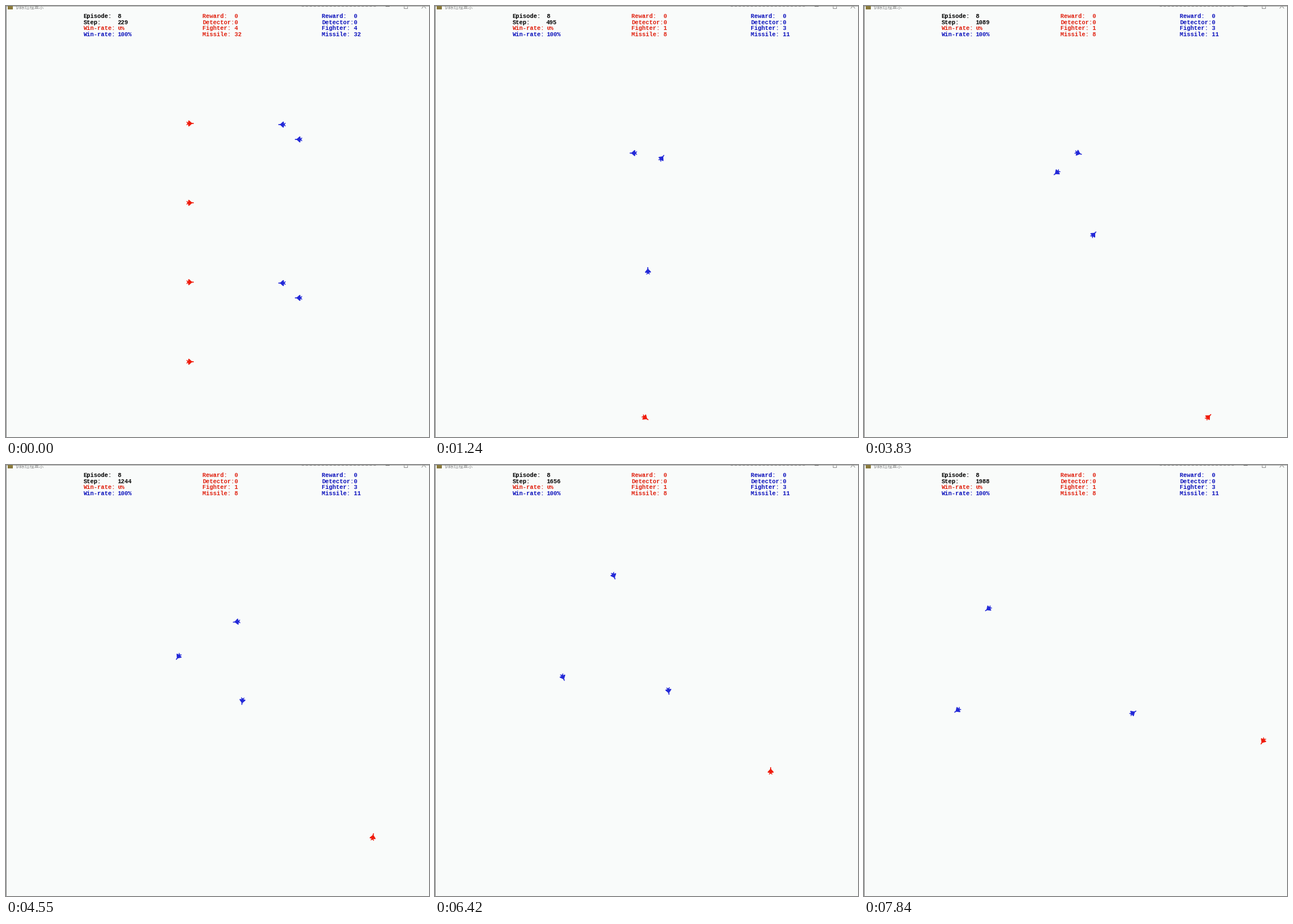
A matplotlib script that plays this animation: 741 by 756 pixels, repeating every 7.99 s.

```python
import numpy as np
import matplotlib.pyplot as plt
from matplotlib.animation import FuncAnimation
from matplotlib.patches import Polygon, Rectangle

W, H, DPI = 741, 756, 64
FRAMES, INTERVAL = 470, 17          # 7990 ms loop
HOLD = 133                          # ms a picture stays, roughly
SPEED = 0.13                        # px per ms

BG = "#f9fbfa"
RED, BLUE = "#f01c0c", "#2329d8"
RED_TEXT, BLUE_TEXT = "#e0200e", "#0a10bc"

# Key moments and the step counter at each
KEYS = (0, 1240, 2590, 3830, 5220, 6420, 7840)
STEPS = (229, 495, 804, 1089, 1398, 1656, 1988)
TIMES = np.concatenate(
    [np.linspace(a, b, round((b - a) / HOLD), endpoint=False)
     for a, b in zip(KEYS, KEYS[1:])] + [KEYS[-1:]])

# Survivors: x, y, heading in degrees at the key moments after the start
RED_PATH = [(368, 722, -35), (511, 698, 30), (603, 721, 44),
            (627, 577, 120), (588, 537, 90), (699, 484, 237)]
BLUE_PATHS = [
    [(348, 258, 180), (345, 225, 192), (338, 292, 218),
     (260, 335, 158), (224, 372, -66), (164, 430, 215)],
    [(397, 267, 52), (361, 229, 188), (375, 258, -20),
     (349, 261, 160), (313, 194, -68), (218, 252, 215)],
    [(373, 465, 93), (338, 494, 68), (402, 401, 48),
     (441, 460, 0), (409, 396, -82), (471, 435, 32)],
]


class Plane:
    """Flies through poses along Hermite curves, or straight on until lost."""

    # Nose spike, wing tip, tail fork; mirrored below
    HALF = np.array([(7, .7), (3.4, 1), (-1.4, 5.3), (-2.6, 5),
                     (-2.9, 1.5), (-5.4, 3.2), (-6, 2.4), (-4.2, 0)])
    SHAPE = np.vstack([HALF, HALF[::-1] * (1, -1)])

    def __init__(self, color, start, path=None, lost=np.inf):
        self.color, self.lost = color, lost
        self.poses = [start] + (path or [])
        self.patch = ax.add_patch(Polygon(self.SHAPE, color=color, lw=0))

    def locate(self, t):
        """Position and velocity at time t."""
        i = min(np.searchsorted(KEYS, t, side="right"), len(KEYS) - 1) - 1
        pose = self.poses[min(i, len(self.poses) - 1)]
        p0, m0 = np.array(pose[:2]), heading(pose[2])
        if len(self.poses) == 1:
            return p0 + m0 * SPEED * t, m0
        nxt = self.poses[i + 1]
        span = KEYS[i + 1] - KEYS[i]
        s = (t - KEYS[i]) / span
        p1, m1 = np.array(nxt[:2]), heading(nxt[2]) * SPEED * span
        m0 = m0 * SPEED * span
        ease = s * s * (3 - 2 * s)
        pos = (p0 + (p1 - p0) * ease
               + s * (1 - s) ** 2 * m0 - s * s * (1 - s) * m1)
        vel = (6 * s * (1 - s) * (p1 - p0)
               + (1 - s) * (1 - 3 * s) * m0 + s * (3 * s - 2) * m1)
        return pos, vel

    def draw(self, t):
        alive = t < self.lost
        self.patch.set_visible(alive)
        if alive:
            pos, vel = self.locate(t)
            c, s = vel / max(np.hypot(*vel), 1e-9)
            self.patch.set_xy(pos + self.SHAPE @ np.array([[c, s], [-s, c]]))
        return alive


def heading(degrees):
    a = np.radians(degrees)
    return np.array([np.cos(a), -np.sin(a)])


def label(x, row, text, color):
    return ax.text(x, 21.2 + 10.45 * row, text, color=color,
                   family="Liberation Mono", weight="bold",
                   size=10.4 * 72 / DPI, va="baseline")


def box(x, y, w, h, color):
    ax.add_patch(Rectangle((x, y), w, h, lw=0, color=color, zorder=4))


def line(xs, ys):
    ax.plot(xs, ys, color="#777777", lw=.8 * 72 / DPI)


fig = plt.figure(figsize=(W / DPI, H / DPI), dpi=DPI, facecolor=BG)
ax = fig.add_axes([0, 0, 1, 1])
ax.set(xlim=(0, W), ylim=(H, 0))
ax.axis("off")

# Window frame and the cut-off title bar
ax.text(17, 4.6, "训练过程显示", color="#8c8c8c", family="Noto Sans CJK JP",
        size=8.4 * 72 / DPI, va="baseline")
box(0, 0, W, 1, "#a4a6a5")
box(0, 0, 1, H, "#7c7e7d")
box(3, 0, 9, 6, "#8a7a3c")
for x in range(518, 650, 7):
    box(x, 0, 4, 1, "#6a6a6a")
box(665, 0, 7, 1, "#444444")
line([697, 697, 703, 703], [0, 3.5, 3.5, 0])
line([728.5, 732, 735.5], [4, 0, 4])

# Scoreboard
label(135.5, 0, "Episode:", "black")
label(195, 0, "8", "black")
label(135.5, 1, "Step:", "black")
step_text = label(195, 1, "", "black")
for row, rate, color in ((2, "0%", RED_TEXT), (3, "100%", BLUE_TEXT)):
    label(135.5, row, "Win-rate:", color)
    label(195, row, rate, color)
box(194, 33, 14, 3.4, BG)
scores = []
for x, color in ((344.3, RED_TEXT), (553.3, BLUE_TEXT)):
    label(x, 0, "Reward:  0", color)
    label(x, 1, "Detector:0", color)
    scores.append((label(x, 2, "", color), label(x, 3, "", color)))

# Red column on the left, two blue pairs on the right
reds = [Plane(RED, (322, 206 + 139.2 * i, 0), lost=520 + 140 * i)
        for i in range(3)]
reds.append(Plane(RED, (322, 624, 0), RED_PATH))
starts = [(x, y + 278 * i, 180) for i in range(2)
          for x, y in ((484, 208), (513, 234))]
blues = [Plane(BLUE, *pair) for pair in zip(starts, BLUE_PATHS)]
blues.append(Plane(BLUE, starts[-1], lost=KEYS[1]))


def update(k):
    now = k * INTERVAL + INTERVAL - 1
    t = TIMES[np.searchsorted(TIMES, now, side="right") - 1]
    step_text.set_text(f"{np.interp(t, KEYS, STEPS):.0f}")
    battle = min(t / 1000, 1)
    for team, spent, (fighter, missile) in zip((reds, blues), (24, 21), scores):
        fighter.set_text(f"Fighter: {sum(p.draw(t) for p in team)}")
        missile.set_text(f"Missile: {32 - spent * battle:.0f}")
    return [step_text]


anim = FuncAnimation(fig, update, frames=FRAMES, interval=INTERVAL,
                     repeat=True, cache_frame_data=False)
plt.show()
```
